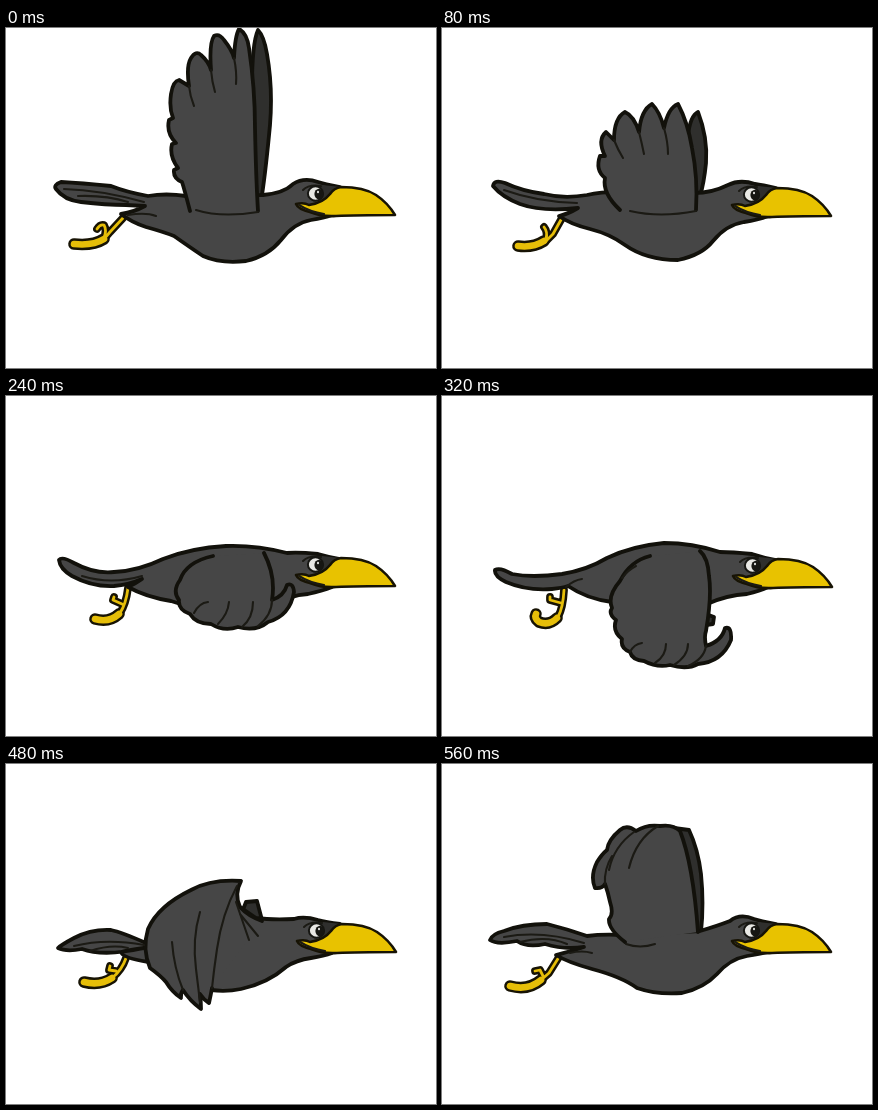
These frames come from a looping animation (430 by 340 pixels, 640 ms). An HTML page:

```html
<!DOCTYPE html>
<html lang="en">
<head>
<meta charset="utf-8">
<title>Flying crow</title>
<style>
  html, body { margin: 0; width: 100%; height: 100%; overflow: hidden; background: #fff; }
  svg { display: block; width: 430px; height: 340px; }
  path, ellipse { stroke-linecap: round; stroke-linejoin: round; }
  .skin { fill: #464646; stroke: #12110b; stroke-width: 3.8; }
  .shade { fill: #2f2f2d; }
  .line { fill: none; stroke: #1b1a14; stroke-width: 2.1; }
  .rim { fill: none; stroke: #171304; }
  .gold { fill: none; stroke: #e6be08; }
  .beak { fill: #e8c200; stroke: #171304; stroke-width: 2.6; }
</style>
</head>
<body>
<svg viewBox="0 0 430 340">
  <path id="far" class="skin shade"/>
  <g id="foot"></g>
  <path id="body" class="skin"/>
  <path id="wing" class="skin"/>
  <path id="lines" class="line"/>
  <g id="head">
    <path class="shade" d="M316 157L335 159L323 168Q318 173 307 174Z"/>
    <path class="beak" d="M335 159Q358 159 370 167Q382 175 389 187Q350 187 330 188Q316 189 304 184Q292 181 290 176Q298 174 303 177Q317 175 324 166Q328 160 335 159Z"/>
    <path class="line" d="M293 177Q304 184 318 186M297 162Q303 156 315 158"/>
    <ellipse cx="309.500" cy="165.500" rx="7.600" ry="7.200" fill="#e8e8e4" stroke="#161612" stroke-width="2"/>
    <ellipse cx="313" cy="166" rx="4.600" ry="5.200" fill="#161612"/>
    <ellipse cx="312" cy="164" rx="1" ry="1.200" fill="#e8e8e4"/>
  </g>
</svg>
<script>
const STEP = 80;

// One wing beat; leg is a thin stroke, toe a thick one.
const poses = [
  {
    head: [0, 0],
    far: 'M246 60Q246 15 252 2Q258 8 261 26Q267 60 264 97Q260 140 256 167L248 170',
    body: 'M334 159Q318 156 312 154Q298 149 287 156Q278 165 257 167L180 168Q160 165 142 168Q120 164 105 158Q75 155 55 154Q47 157 50 161Q58 172 75 174Q100 177 120 177L139 178Q128 184 115 186Q125 194 140 199Q158 204 168 208Q185 220 197 228Q215 236 240 233Q262 228 275 212Q288 195 305 192Q318 190 326 187',
    wing: 'M184 183Q178 160 176 154Q167 150 168 142L172 140Q163 128 166 116L170 115Q160 105 163 92L167 90Q163 80 165 66Q167 53 173 52L183 58Q180 38 185 30Q190 22 195 27Q203 34 205 42Q203 15 208 8Q213 5 218 12Q226 22 228 30Q229 8 233 1Q241 5 243 20Q249 60 249 100Q250 150 252 183',
    lines: 'M183 58Q184 68 188 78M205 42Q206 54 209 64M228 30Q231 44 230 56M190 182Q215 190 252 184M58 161Q95 162 138 174M72 168Q100 167 122 174M122 187Q140 184 150 188',
    leg: 'M117 190L104 204L98 211M98 210Q101 202 98 197Q94 196 91 201',
    toe: 'M98 211Q87 218 68 216'
  },
  {
    head: [0, 1],
    far: 'M246 108Q248 88 256 84Q266 110 264 135Q262 155 258 168L248 170',
    body: 'M334 160Q320 157 313 156Q298 151 286 157Q270 165 252 165L185 164Q162 163 145 167Q122 171 102 166Q80 163 63 155Q52 151 51 158Q60 169 78 176Q100 184 136 180Q126 186 117 188Q128 196 148 201Q168 206 183 217Q204 232 236 232Q260 227 271 213Q284 197 302 194Q316 192 326 188',
    wing: 'M178 182Q160 165 163 150Q153 142 158 128L163 128Q155 112 164 104L172 112Q172 90 183 84Q192 88 197 104Q199 82 210 76Q218 84 222 100Q226 80 236 76Q246 95 250 120Q256 150 254 182',
    lines: 'M172 112Q176 122 181 130M197 104Q200 116 202 126M222 100Q226 114 226 126M188 183Q218 190 254 183M62 162Q95 174 135 175',
    leg: 'M120 190L111 206L103 214M104 211Q106 204 102 199',
    toe: 'M102 213Q91 220 76 218'
  },
  {
    head: [0, 2],
    far: '',
    body: 'M334 162Q322 160 314 158Q296 156 285 158Q250 153 215 154Q180 155 150 163Q120 174 95 174Q80 169 65 157Q56 150 53 155Q55 165 68 175Q85 186 105 187Q118 187 134 182Q128 186 121 190Q135 198 155 202Q175 206 195 218Q215 231 238 230Q258 227 268 213Q280 200 298 198Q315 195 325 190',
    wing: 'M200 157Q174 161 172 172Q174 182 195 187Q230 194 260 188Q283 181 287 160Q286 148 281 148Q275 151 274 160L268 151L263 159L250 154L244 161Q220 154 200 157Z',
    lines: 'M174 173Q181 161 194 163Q184 171 182 181M185 177Q195 165 209 164Q200 171 201 180Q212 166 224 165M222 188Q242 180 247 160M250 156Q258 160 257 170Q253 185 240 190M274 160Q268 180 250 188M263 160Q268 164 265 174M66 169Q95 188 134 178M134 184L146 187',
    leg: 'M122 190Q119 206 111 215M113 209L106 203L107 200',
    toe: 'M110 215Q98 221 83 223'
  },
  {
    head: [0, 3],
    far: '',
    body: 'M334 163Q322 161 312 158Q292 156 281 157Q250 149 220 150Q185 152 157 163Q132 175 108 176Q88 178 68 167Q56 160 53 164Q54 173 66 180Q86 191 108 190Q122 189 136 183Q129 188 122 191Q140 201 165 205Q185 211 202 217Q220 227 240 224Q258 220 267 210Q283 199 302 198Q316 195 326 191',
    wing: 'M207 160Q180 166 174 184Q166 195 173 204Q172 214 184 218Q190 228 205 228Q218 236 232 231Q250 236 262 226Q284 220 288 196Q287 186 281 189Q278 200 266 204Q270 180 258 157',
    lines: 'M188 217Q193 207 202 206M212 228Q222 218 223 206M236 231Q247 222 247 206M266 204Q266 219 252 230M76 180Q105 189 136 180',
    leg: 'M122 192Q120 208 114 217M116 208L107 204L108 201',
    toe: 'M113 218Q103 227 89 223'
  },
  {
    head: [1, 4],
    far: 'M264 218L272 221L271 228L264 229',
    body: 'M334 164Q322 162 310 158Q290 156 278 156Q250 147 222 147Q190 150 165 162Q145 174 120 178Q90 182 70 178Q58 171 53 174Q52 180 64 186Q85 195 110 193Q120 192 126 190Q145 203 170 206L265 208Q285 199 305 198Q318 195 326 191',
    wing: 'M208 160Q188 165 178 185Q165 200 170 212Q166 218 174 224Q170 235 180 243Q178 252 188 256Q190 264 202 265Q215 272 228 269Q245 274 256 268Q280 266 289 244Q290 230 283 232Q280 245 264 250Q262 240 264 235Q270 200 267 180Q266 162 258 155',
    lines: 'M188 256Q192 248 200 247M213 267Q224 260 224 248M232 269Q246 260 246 248M264 250Q262 263 246 270M124 191Q132 184 140 183M180 182Q186 174 194 170',
    leg: 'M122 194Q121 212 116 221M119 207L108 204L108 201',
    toe: 'M115 222Q107 230 97 226Q92 222 94 218'
  },
  {
    head: [2, 2],
    far: 'M266 204Q262 240 261 270Q264 285 271 283Q270 292 260 292L248 292L250 210',
    body: 'M335 161Q322 160 314 157Q298 154 285 156Q262 145 225 144Q190 147 165 160Q145 171 130 171Q110 171 98 174Q70 178 52 183Q46 188 55 189Q85 192 106 190Q124 189 138 186Q128 189 121 192Q140 202 168 205L262 207Q290 200 305 196Q318 192 326 190',
    wing: 'M205 160Q185 172 176 188Q164 205 166 220Q160 228 164 240Q162 255 169 265Q165 275 172 290Q175 300 182 305Q180 318 190 325Q200 330 207 324Q210 336 220 337Q228 341 232 335Q245 339 255 336Q263 335 264 328Q258 330 250 325Q246 315 249 295Q254 250 262 215Q266 180 260 160',
    lines: 'M182 305Q184 296 182 288M207 324Q201 312 199 298M232 335Q226 320 225 303M250 325Q244 314 245 300M62 185Q100 178 140 181M85 190Q110 182 150 184',
    leg: 'M121 194Q118 208 109 219M115 208L106 206L106 202',
    toe: 'M109 219Q98 227 86 225'
  },
  {
    head: [1, 1],
    far: 'M236 148L240 138L251 137L256 156',
    body: 'M334 160Q320 158 312 156Q298 152 288 155Q265 156 250 154L234 143L150 178L140 179Q115 168 105 166Q85 165 68 174Q55 181 52 184Q60 188 76 185Q98 193 138 184Q124 186 115 188Q116 194 143 198L205 226Q220 228 235 225Q262 219 280 203Q290 196 305 194Q318 192 326 189',
    wing: 'M256 157Q242 152 234 143Q228 130 235 117Q205 115 185 126Q152 142 142 165Q136 185 144 204Q155 212 160 218Q166 228 175 234Q174 230 177 226Q184 237 195 245Q195 238 194 230Q198 236 203 239Q205 230 206 224',
    lines: 'M231 122Q216 150 211 185Q208 205 206 224M194 148Q186 175 190 205L194 238M166 178Q168 204 177 226M230 138L243 176M234 150L252 172M68 182Q100 174 138 181M84 187Q105 180 122 184',
    leg: 'M120 194Q116 206 106 214M110 207L103 206L104 202',
    toe: 'M106 214Q94 222 78 218'
  },
  {
    head: [0, 1],
    far: 'M232 64L247 66Q256 85 259 110Q262 140 259 168L246 170',
    body: 'M334 160Q318 157 312 155Q298 149 288 157Q275 162 258 167L180 171Q160 170 145 172Q125 165 105 160Q80 160 62 167Q50 170 48 176Q55 181 75 177Q85 184 103 180Q122 186 142 183Q126 188 114 191Q125 198 150 205Q180 213 195 224Q215 231 240 229Q262 224 275 210Q288 195 305 192Q318 190 326 188',
    wing: 'M183 178Q166 165 167 155Q172 150 168 138Q166 128 163 120Q160 125 153 124Q148 112 155 98Q160 90 165 86Q166 76 178 66Q185 60 194 67Q205 60 218 62Q231 60 238 67Q251 100 256 168',
    lines: 'M163 120Q162 105 170 92M192 68Q172 82 167 106M216 62Q194 75 187 104M184 180Q198 185 213 180M62 173Q100 166 142 179M78 178Q105 171 125 180M128 189Q140 186 150 189',
    leg: 'M117 193L107 209L99 216M101 212L98 206L93 207',
    toe: 'M99 216Q86 227 68 222'
  }
];

const el = id => document.getElementById(id);

// Each limb is a dark stroke with a narrower yellow one above it.
function limbs(parent, specs) {
  const layer = (name, extra) => specs.map(([, width]) => {
    const path = document.createElementNS('http://www.w3.org/2000/svg', 'path');
    path.setAttribute('class', name);
    path.setAttribute('stroke-width', width + extra);
    return parent.appendChild(path);
  });
  const rims = layer('rim', 5), golds = layer('gold', 0);
  return pose => specs.forEach(([key], i) =>
    [rims[i], golds[i]].forEach(path => path.setAttribute('d', pose[key])));
}

const drawFoot = limbs(el('foot'), [['leg', 2.8], ['toe', 6.6]]);
let shown = -1;

function draw(time) {
  const index = Math.floor(time / STEP) % poses.length;
  if (index !== shown) {
    shown = index;
    const pose = poses[index];
    for (const part of ['far', 'body', 'wing', 'lines']) el(part).setAttribute('d', pose[part]);
    el('head').setAttribute('transform', `translate(${pose.head})`);
    drawFoot(pose);
  }
}

function tick() {
  draw(performance.now());
  requestAnimationFrame(tick);
}
tick();
</script>
</body>
</html>
```
